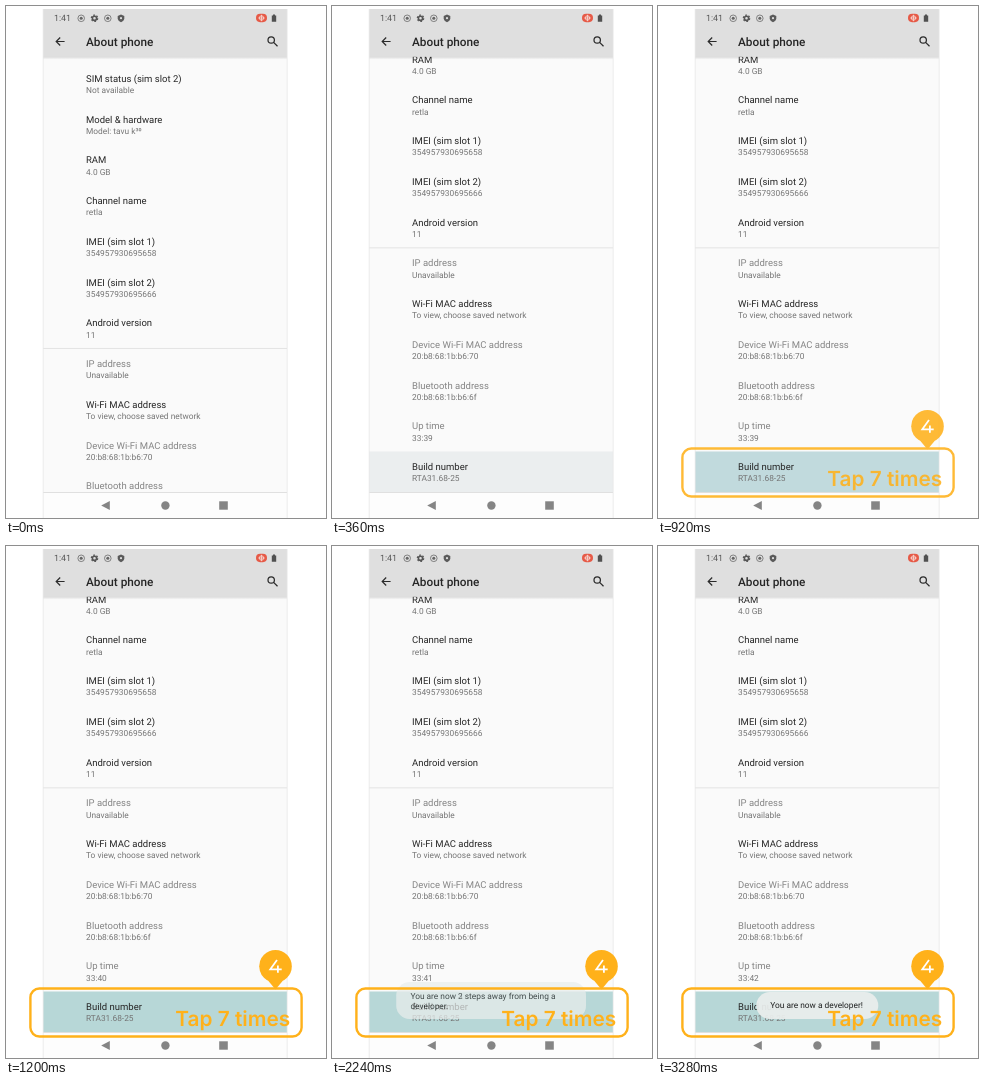
Recreate the animation shown at these times as an HTML page. Size 320 by 512 pixels, loop 3800 ms.

```html
<!DOCTYPE html>
<html lang="en">
<head>
<meta charset="utf-8">
<title>About phone</title>
<style>
  html, body { margin: 0; width: 100%; height: 100%; overflow: hidden; background: #fff; }
  svg { display: block; width: 320px; height: 512px; }
  text { font-family: Roboto, "Noto Sans", sans-serif; text-rendering: geometricPrecision; white-space: pre; }
  .main { font-size: 9.5px; fill: #262626; }
  .dim { fill: #858585; }
  .sub { font-size: 8.36px; fill: #747474; }
  .toast text { font-size: 8.36px; fill: #1d1f1f; }
  .toast rect { fill: #e9edec; fill-opacity: .94; }
  .mark text { font-family: Inter, "Open Sans", sans-serif; font-weight: 600; }
</style>
</head>
<body>
<svg viewBox="0 0 320 512">
  <defs>
    <clipPath id="view"><rect x="37" y="50.5" width="244" height="436"/></clipPath>
    <linearGradient id="shade" x1="0" y1="0" x2="0" y2="1">
      <stop offset="0" stop-color="#000" stop-opacity=".13"/>
      <stop offset="1" stop-color="#000" stop-opacity="0"/>
    </linearGradient>
  </defs>
  <rect width="320" height="512" fill="#fff"/>
  <rect x="37" y="3" width="244" height="509" fill="#fafafa"/>

  <g clip-path="url(#view)"><g id="list"></g></g>

  <!-- status and title bars -->
  <rect x="37" y="3" width="244" height="47.6" fill="#dfdfdf"/>
  <rect x="37" y="50.6" width="244" height="3" fill="url(#shade)"/>
  <text x="48" y="15.2" font-size="8.8" fill="#555">1:41</text>
  <g id="icons" fill="none" stroke="#6a6a6a"></g>
  <path d="M115 8.6l3.3 1.3v2.4c0 2-1.5 3.3-3.3 4-1.8-.7-3.3-2-3.3-4V9.9z" fill="#5a5a5a"/>
  <circle cx="115" cy="12.2" r="1.1" fill="#dfdfdf"/>
  <rect x="250" y="7.8" width="11" height="8.4" rx="4.1" fill="#e65a47"/>
  <g fill="none" stroke="#f8ddd8" stroke-width=".8">
    <circle cx="255.5" cy="12" r="2.2"/><path d="M252.3 12h6.4M255.5 8.8v6.4"/>
  </g>
  <path d="M267 8.6h2v.8h1.2v6.3h-4.4V9.4H267z" fill="#505050"/>
  <path d="M58.6 35.5h-8.4M54.2 31.5l-4 4 4 4" fill="none" stroke="#2a2a2a" stroke-width="1.2"/>
  <text x="80" y="39.7" font-size="11.8" font-weight="500" fill="#262626">About phone</text>
  <g fill="none" stroke="#2a2a2a" stroke-width="1.25">
    <circle cx="265.2" cy="34" r="3.2"/><path d="M267.6 36.4l3.9 3.9"/>
  </g>

  <!-- navigation bar -->
  <rect x="37" y="486" width="244" height="26" fill="#fdfdfd"/>
  <path d="M37 486.5h244" stroke="#e0e0e0"/>
  <path d="M37.2 3v509M281.2 3v509" stroke="#e9e9e9" stroke-width=".8"/>
  <g fill="#858585">
    <path d="M95.2 499.5l8.6-4.6v9.2z"/>
    <circle cx="159.4" cy="499.5" r="4.2"/>
    <rect x="213.2" y="495.3" width="8.6" height="8.4"/>
  </g>

  <g id="toasts"></g>

  <g id="mark" class="mark" fill="#ffb11a">
    <rect x="24.4" y="442.5" width="271.2" height="48" rx="9" fill="none" stroke="#ffb11a" stroke-width="2.4"/>
    <circle cx="269.5" cy="420.2" r="16.3"/>
    <path d="M262 434.5h15l-7.5 9z"/>
    <path d="M271 414l-6.7 9.3h11.4M271.9 419.6v7.2" fill="none" stroke="#fff" stroke-width="1.8"/>
    <text x="169.3" y="480.2" font-size="20.8">Tap 7 times</text>
  </g>
</svg>
<script>
const LOOP = 3800, STEP = 40, FADE = 280, PITCH = 40.75;
const $ = id => document.getElementById(id);

function add(parent, tag, attrs, text = "") {
  const el = document.createElementNS("http://www.w3.org/2000/svg", tag);
  for (const k in attrs) el.setAttribute(k, attrs[k]);
  el.textContent = text;
  return parent.appendChild(el);
}

// title, value, dimmed
const rows = [
  ["SIM status (sim slot 2)", "Not available"],
  ["Model & hardware", "Model: tavu k³⁰"],
  ["RAM", "4.0 GB"],
  ["Channel name", "retla"],
  ["IMEI (sim slot 1)", "354957930695658"],
  ["IMEI (sim slot 2)", "354957930695666"],
  ["Android version", "11"],
  ["IP address", "Unavailable", true],
  ["Wi-Fi MAC address", "To view, choose saved network"],
  ["Device Wi-Fi MAC address", "20:b8:68:1b:b6:70", true],
  ["Bluetooth address", "20:b8:68:1b:b6:6f", true],
  ["Up time", "33:38", true],
  ["Build number", "RTA31.68-25"]
];
const list = $("list");
const top0 = 57.1, buildTop = top0 + 12 * PITCH;
const build = add(list, "rect", { x: 37, y: buildTop, width: 244, height: PITCH });
add(list, "rect", { x: 37, y: top0 + 7 * PITCH - .4, width: 244, height: 1, fill: "#e3e3e3" });
const values = rows.map(([title, value, dim], i) => {
  const y = top0 + i * PITCH;
  add(list, "text", { x: 80, y: y + 18.7, class: dim ? "main dim" : "main" }, title);
  return add(list, "text", { x: 80, y: y + 29.9, class: "sub" }, value);
});
const upTime = values[11];

const icons = $("icons");
for (const x of [75.2, 101.8]) {
  add(icons, "circle", { cx: x, cy: 12.3, r: 3.3, "stroke-width": .8 });
  add(icons, "circle", { cx: x, cy: 12.3, r: 1.5, fill: "#666", stroke: "none" });
}
add(icons, "circle", { cx: 88.5, cy: 12.3, r: 2.1, "stroke-width": 1.6, stroke: "#555" });
add(icons, "circle", { cx: 88.5, cy: 12.3, r: 3.2, "stroke-width": 1.2, stroke: "#555", "stroke-dasharray": "1.75 1.6" });

const away = n => [`You are now ${n} step${n > 1 ? "s" : ""} away from being a`, "developer."];
const toasts = [
  [1400, away(4)], [1760, away(3)], [2120, away(2)], [2480, away(1)],
  [3000, ["You are now a developer!"]]
].map(([start, lines]) => {
  const el = add($("toasts"), "g", { class: "toast" });
  const wide = lines.length > 1;
  add(el, "rect", wide
    ? { x: 64.3, y: 436, width: 189.7, height: 37, rx: 13.5 }
    : { x: 98.3, y: 446, width: 122, height: 27, rx: 13.5 });
  lines.forEach((s, i) => add(el, "text", { x: wide ? 78.4 : 112.3, y: (wide ? 452.9 : 462.4) + i * 9.6 }, s));
  return { start, el };
});

// [time, value...] tables
const scroll = [[0, 0], [40, 38], [80, 71], [120, 92], [160, 99.6], [320, 100.6]];
const tint = [
  [120, 250, 250, 250], [160, 230, 234, 236], [320, 230, 234, 236], [480, 249, 249, 249],
  [620, 249, 249, 249], [840, 198, 221, 224], [920, 193, 218, 221], [1040, 183, 215, 215]
];

const ramp = (t, start, len) => Math.min(1, Math.max(0, (t - start) / len));

function at(table, t) {
  const n = table.findIndex(k => k[0] > t);
  if (n < 0) return table[table.length - 1].slice(1);
  if (n === 0) return table[0].slice(1);
  const a = table[n - 1], b = table[n], p = (t - a[0]) / (b[0] - a[0]);
  return a.slice(1).map((v, i) => v + (b[i + 1] - v) * p);
}

function draw(t) {
  list.setAttribute("transform", `translate(0 ${-at(scroll, t)[0]})`);
  build.setAttribute("fill", `rgb(${at(tint, t).map(Math.round)})`);
  upTime.textContent = "33:" + (38 + Math.floor((t + 800) / 1000));
  $("mark").setAttribute("opacity", ramp(t, 500, 480));
  toasts.forEach(({ start, el }, i) => {
    const next = toasts[i + 1];
    const gone = next ? ramp(t, next.start, FADE) : 0;
    el.setAttribute("opacity", ramp(t, start, FADE) * (1 - gone));
  });
}

const begin = performance.now();
function tick() {
  const t = (performance.now() - begin) % LOOP;
  draw(Math.floor((t + 2) / STEP) * STEP % LOOP);
  requestAnimationFrame(tick);
}
tick();
</script>
</body>
</html>
```
